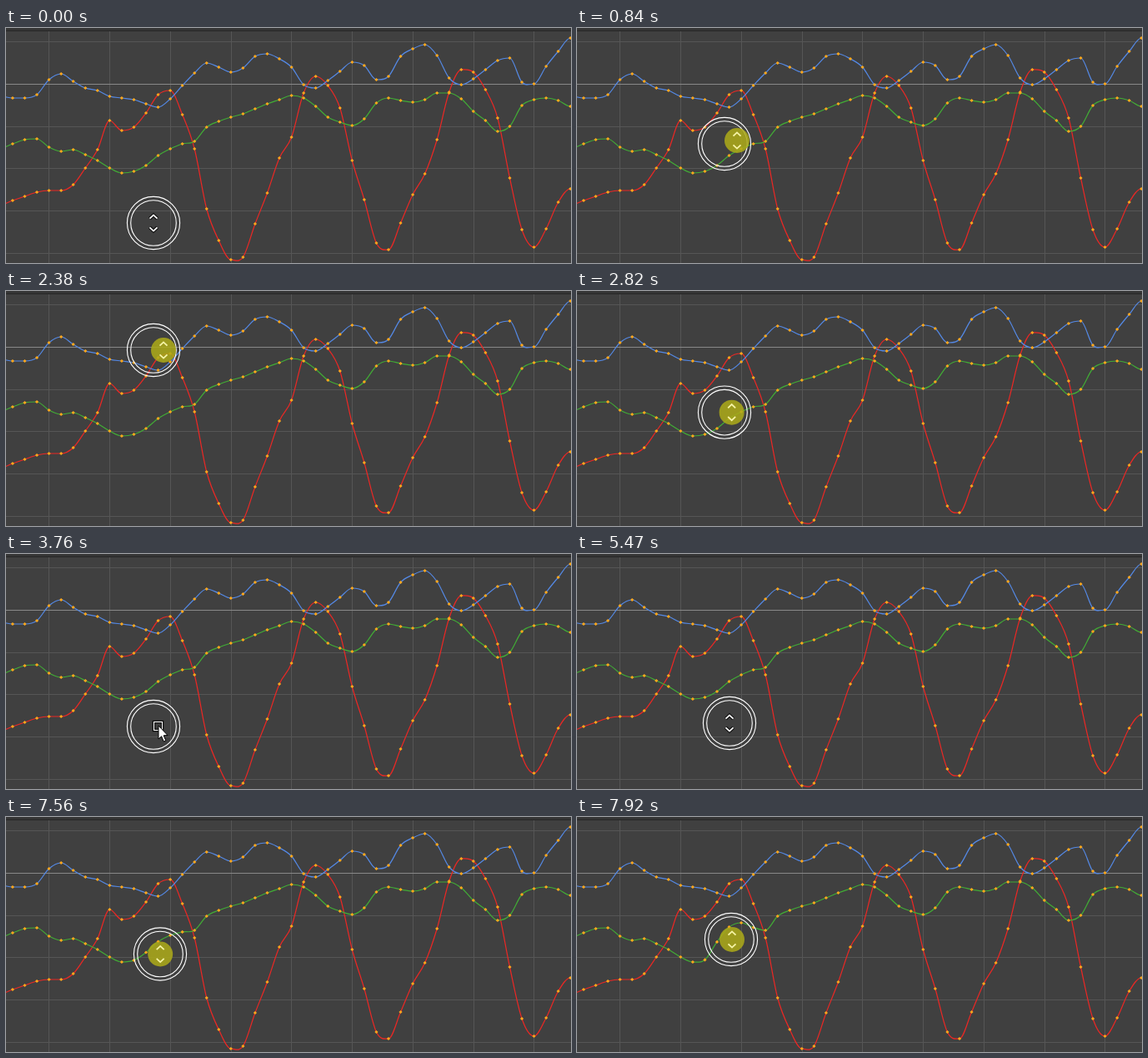
Write an HTML page with a canvas that moves like this. It is 678 px wide and 282 px high and loops after 7990 ms.

```html
<!DOCTYPE html>
<html lang="en">
<head>
<meta charset="utf-8">
<title>Curve sculpting</title>
<style>
  html, body { margin: 0; width: 100%; height: 100%; overflow: hidden; background: #404040; }
  canvas { display: block; width: 678px; height: 282px; }
</style>
</head>
<body>
<canvas id="stage"></canvas>
<script>
const W = 678, H = 282, LOOP = 7990;
const X0 = -6.6, DX = 14.55, RADIUS = 32;
const PRESS_1 = 490, RELEASE_1 = 3760, MOVE_2 = 5470, PRESS_2 = 7130, DRAG_2 = 7560;

const curves = {
  blue: { color: '#5489e6', keys: [
    82, 84, 84, 80, 62, 55, 64, 72, 75, 82, 84, 86, 91, 95, 85, 69, 54, 42, 47, 53, 48, 34, 31, 37,
    47, 68, 72, 63, 52, 41, 45, 62, 58, 34, 25, 20, 33, 60, 68, 61, 50, 39, 36, 65, 67, 46, 28, 12] },
  green: { color: '#41ac35', keys: [
    144, 139, 134, 133, 143, 148, 146, 152, 159, 168, 174, 172, 165, 153, 145, 139, 136, 119, 112, 107, 103, 97, 91, 86,
    81, 84, 94, 107, 113, 117, 109, 90, 84, 87, 89, 86, 78, 78, 85, 100, 111, 124, 118, 93, 86, 84, 87, 94] },
  red: { color: '#ec2724', keys: [
    212, 207, 202, 197, 195, 195, 188, 168, 146, 111, 123, 119, 102, 80, 75, 104, 145, 217, 255, 278, 275, 235, 198, 156,
    131, 78, 58, 69, 96, 159, 206, 258, 266, 234, 200, 175, 134, 77, 50, 53, 74, 108, 180, 242, 263, 241, 209, 193] }
};

// start, end, steps, then the pose reached: brush x, y, pointer x, y
const moves = [
  [490, 840, 6, 177, 139, 192, 135],
  [920, 1280, 5, 177, 67, 193, 67],
  [1430, 1720, 5, 177, 194, 190, 194],
  [1870, 2380, 8, 177, 71, 189, 71],
  [2460, 2600, 3, 177, 115, 187, 115],
  [2680, 3040, 6, 177, 207, 183, 207],
  [5470, 5470, 1, 183, 203, 183, 203],
  [5542, 6120, 9, 185, 168, 185, 168],
  [7560, 7920, 6, 185, 147, 186, 147]
];

const canvas = document.getElementById('stage');
const ratio = window.devicePixelRatio || 1;
canvas.width = W * ratio;
canvas.height = H * ratio;
const ctx = canvas.getContext('2d');
ctx.scale(ratio, ratio);

function poseAt(t) {
  let pose = [177, 234, 177, 234];
  for (const [start, end, steps, ...goal] of moves) {
    if (t < start) break;
    const gap = (end - start) / (steps - 1) || 1;
    const done = Math.min(steps, Math.floor((t - start) / gap + 1e-6) + 1) / steps;
    pose = pose.map((v, i) => v + (goal[i] - v) * done);
  }
  return pose;
}

function rect(x, y, w, h, color) {
  ctx.fillStyle = color;
  ctx.fillRect(x, y, w, h);
}

function drawGrid() {
  rect(0, 0, W, H, '#404040');
  for (let i = 0; i < 9; i++) rect(Math.round(51.3 + i * 72.75), 4, 1, H, '#565656');
  for (let i = 0; i < 6; i++) rect(0, Math.round(16 + i * 50.8), W, 1, i === 1 ? '#888888' : '#565656');
  rect(0, 0, W, 3, '#353535');
  rect(0, 3, W, 1, '#272727');
}

// Flat at extremes, otherwise follows the neighbours
function slope(ys, i) {
  const a = ys[i - 1] ?? ys[i], b = ys[i + 1] ?? ys[i];
  return (ys[i] - a) * (b - ys[i]) <= 0 ? 0 : (b - a) / 2;
}

function drawCurve(ys, color) {
  const x = i => X0 + i * DX;
  ctx.beginPath();
  ctx.moveTo(x(0), ys[0]);
  for (let i = 1; i < ys.length; i++) {
    ctx.bezierCurveTo(
      x(i - 1) + DX / 3, ys[i - 1] + slope(ys, i - 1) / 3,
      x(i) - DX / 3, ys[i] - slope(ys, i) / 3,
      x(i), ys[i]);
  }
  ctx.strokeStyle = color;
  ctx.lineWidth = 1.2;
  ctx.stroke();
}

function drawKeys(ys) {
  ctx.fillStyle = '#ffa81c';
  ctx.beginPath();
  ys.forEach((y, i) => {
    const x = X0 + i * DX, r = 2.1;
    ctx.moveTo(x, y - r);
    ctx.lineTo(x + r, y);
    ctx.lineTo(x, y + r);
    ctx.lineTo(x - r, y);
    ctx.closePath();
  });
  ctx.fill();
}

// Brush lift with a quadratic falloff
function lifted(ys, cx, lift) {
  return ys.map((y, i) => {
    const d = (X0 + i * DX - cx) / RADIUS;
    return y - lift * Math.max(0, 1 - d * d);
  });
}

function drawRings(x, y) {
  ctx.strokeStyle = '#ffffff';
  ctx.lineWidth = 1.1;
  for (const r of [31.6, 27.3]) {
    ctx.beginPath();
    ctx.arc(x, y, r, 0, Math.PI * 2);
    ctx.stroke();
  }
}

function drawPress(x, y) {
  ctx.fillStyle = 'rgba(172, 170, 24, .86)';
  ctx.beginPath();
  ctx.arc(x, y, 15, 0, Math.PI * 2);
  ctx.fill();
}

function drawChevrons(x, y, pressed) {
  ctx.beginPath();
  for (const s of [-1, 1]) {
    ctx.moveTo(x - 4.5, y + s * 5.3);
    ctx.lineTo(x, y + s * 9.6);
    ctx.lineTo(x + 4.5, y + s * 5.3);
  }
  ctx.lineJoin = 'miter';
  if (!pressed) {
    ctx.strokeStyle = '#0c0c0c';
    ctx.lineWidth = 4;
    ctx.stroke();
  }
  ctx.strokeStyle = pressed ? '#f6f4a6' : '#ffffff';
  ctx.lineWidth = 1.8;
  ctx.stroke();
}

function drawArrow(x, y) {
  ctx.lineJoin = 'miter';
  for (const [color, width] of [['#000000', 3.4], ['#ffffff', 1.2]]) {
    ctx.strokeStyle = color;
    ctx.lineWidth = width;
    ctx.strokeRect(x - 5.5, y - 5.5, 10, 10);
  }
  const shape = [[0, -1], [0, 15], [3.6, 11.8], [6.2, 18], [8.8, 16.9], [6.2, 10.8], [11, 10.6]];
  ctx.beginPath();
  shape.forEach(([dx, dy]) => ctx.lineTo(x + dx, y + dy));
  ctx.closePath();
  ctx.fillStyle = '#ffffff';
  ctx.fill();
  ctx.strokeStyle = '#000000';
  ctx.lineWidth = 1;
  ctx.stroke();
}

function draw(t) {
  const [bx, by, px, py] = poseAt(t);
  const { blue, green, red } = curves;
  const greenKeys = t >= DRAG_2 ? lifted(green.keys, 185, 168 - by) : green.keys;
  const pressed = (t >= PRESS_1 && t < RELEASE_1) || t >= PRESS_2;

  drawGrid();
  const sets = [[red.keys, red.color], [greenKeys, green.color], [blue.keys, blue.color]];
  sets.forEach(([ys, color]) => drawCurve(ys, color));
  sets.forEach(([ys]) => drawKeys(ys));
  drawRings(bx, by);
  if (pressed) drawPress(px, py);
  if (t >= RELEASE_1 && t < MOVE_2) drawArrow(px, py);
  else drawChevrons(px, py, pressed);
}

const begin = performance.now();
function tick() {
  draw((performance.now() - begin) % LOOP);
  requestAnimationFrame(tick);
}
tick();
</script>
</body>
</html>
```
